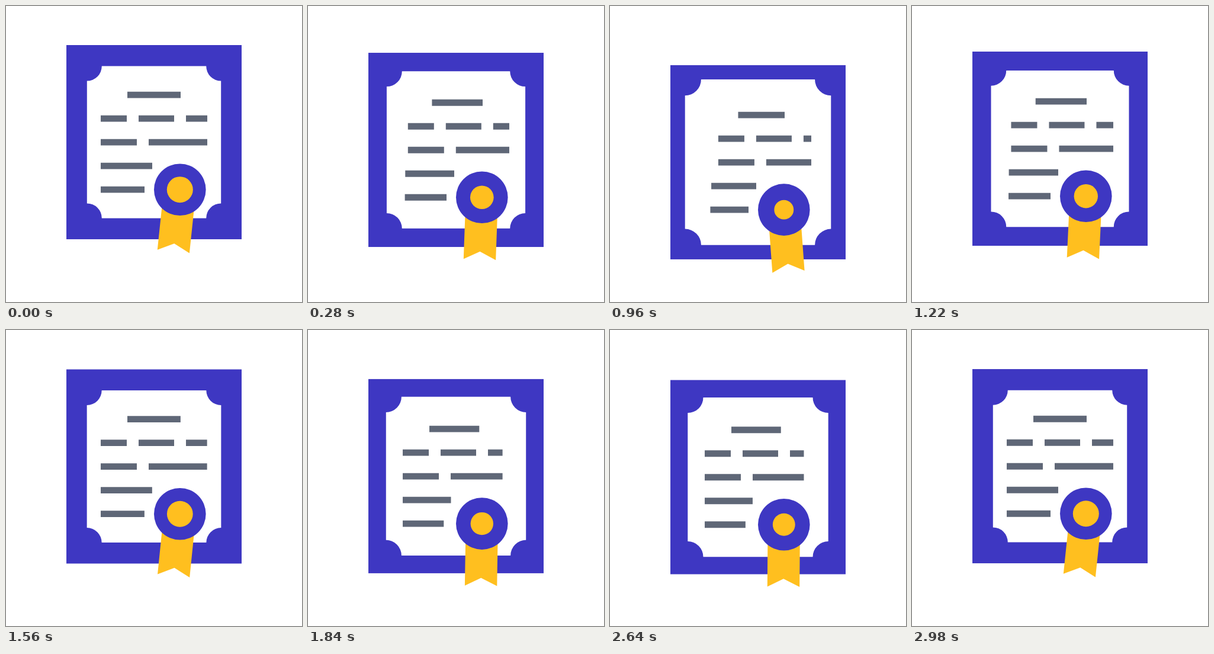
An HTML page for the animation above (3 s loop, 500x500 px).

```html
<!DOCTYPE html>
<html lang="en">
<head>
<meta charset="utf-8">
<title>Certificate</title>
<style>
  html, body { margin: 0; width: 100%; height: 100%; overflow: hidden; background: #fff; }
  svg { display: block; width: 100vw; height: 100vh; }
  .purple { fill: #3e37c2; }
  .gold { fill: #ffbf1f; }
  #lines { stroke: #5f6777; stroke-width: 10.8; }
</style>
</head>
<body>
<svg viewBox="0 0 500 500">
  <g id="card">
    <rect class="purple" x="102" y="66" width="296" height="328"/>
    <path id="paper" fill="#fff" d="M-88.2-128.4H88.2A25 25 0 0 0 113.2-103.4V103.4A25 25 0 0 0 88.2 128.4H-88.2A25 25 0 0 0-113.2 103.4V-103.4A25 25 0 0 0-88.2-128.4Z"/>
    <g id="lines"></g>
    <g transform="translate(293.8 310.2)">
      <path id="ribbon" class="gold" d="M-27.2 0H27.2V105L0 91.6L-27.2 105Z"/>
      <circle class="purple" r="43.8"/>
      <circle id="core" class="gold" r="22"/>
    </g>
  </g>
</svg>
<script>
  const LOOP = 3000;
  const HALF = 750;
  const DROP = 40;
  const TRIM = 0.15;

  // Bezier handle positions for each half swing: down, up, down, up
  const EASES = [[0.42, 0.5], [0.46, 0.54], [0.42, 0.58], [0.42, 0.58]];

  // Text rules: start x, end x, centre y, dash pattern
  const ROWS = [
    [205, 295, 150.2, 'none'],
    [160, 340, 190.2, '44 20 60 20 60 20'],
    [160, 340, 230.2, '61 20 120 20'],
    [160, 247, 270.2, 'none'],
    [160, 234, 310.2, 'none']
  ];

  const $ = id => document.getElementById(id);
  const card = $('card'), paper = $('paper'), ribbon = $('ribbon'), core = $('core');

  function setAttrs(el, attrs) {
    for (const key in attrs) el.setAttribute(key, attrs[key]);
  }

  const lines = ROWS.map(([x1, x2, y, dash]) => {
    const line = document.createElementNS('http://www.w3.org/2000/svg', 'line');
    setAttrs(line, { x1, x2, y1: y, y2: y, 'stroke-dasharray': dash });
    return $('lines').appendChild(line);
  });

  // Cubic bezier (a, 0, b, 1) solved by bisection
  function ease(x, [a, b]) {
    let lo = 0, hi = 1;
    for (let i = 0; i < 24; i++) {
      const t = (lo + hi) / 2, u = 1 - t;
      if (3 * a * t * u * u + 3 * b * t * t * u + t * t * t < x) lo = t;
      else hi = t;
    }
    return lo * lo * (3 - 2 * lo);
  }

  function draw(time) {
    const part = Math.floor(time / HALF);
    const eased = ease(time % HALF / HALF, EASES[part]);
    const p = part % 2 ? 1 - eased : eased;

    card.setAttribute('transform', `translate(0 ${DROP * p})`);
    paper.setAttribute('transform', `translate(250 230) scale(${1 + 0.105 * p})`);
    ribbon.setAttribute('transform', `rotate(${6 - 12 * p})`);
    core.setAttribute('r', 22 * (1 - 0.3 * p));

    // The first swing trims line starts, the second trims line ends
    ROWS.forEach(([x1, x2], i) => {
      const cut = (x2 - x1) * TRIM * p;
      setAttrs(lines[i], part < 2 ? { x1: x1 + cut, x2 } : { x1, x2: x2 - cut });
    });
  }

  const start = performance.now();
  function tick() {
    draw((performance.now() - start) % LOOP);
    requestAnimationFrame(tick);
  }
  draw(0);
  requestAnimationFrame(tick);
</script>
</body>
</html>
```
